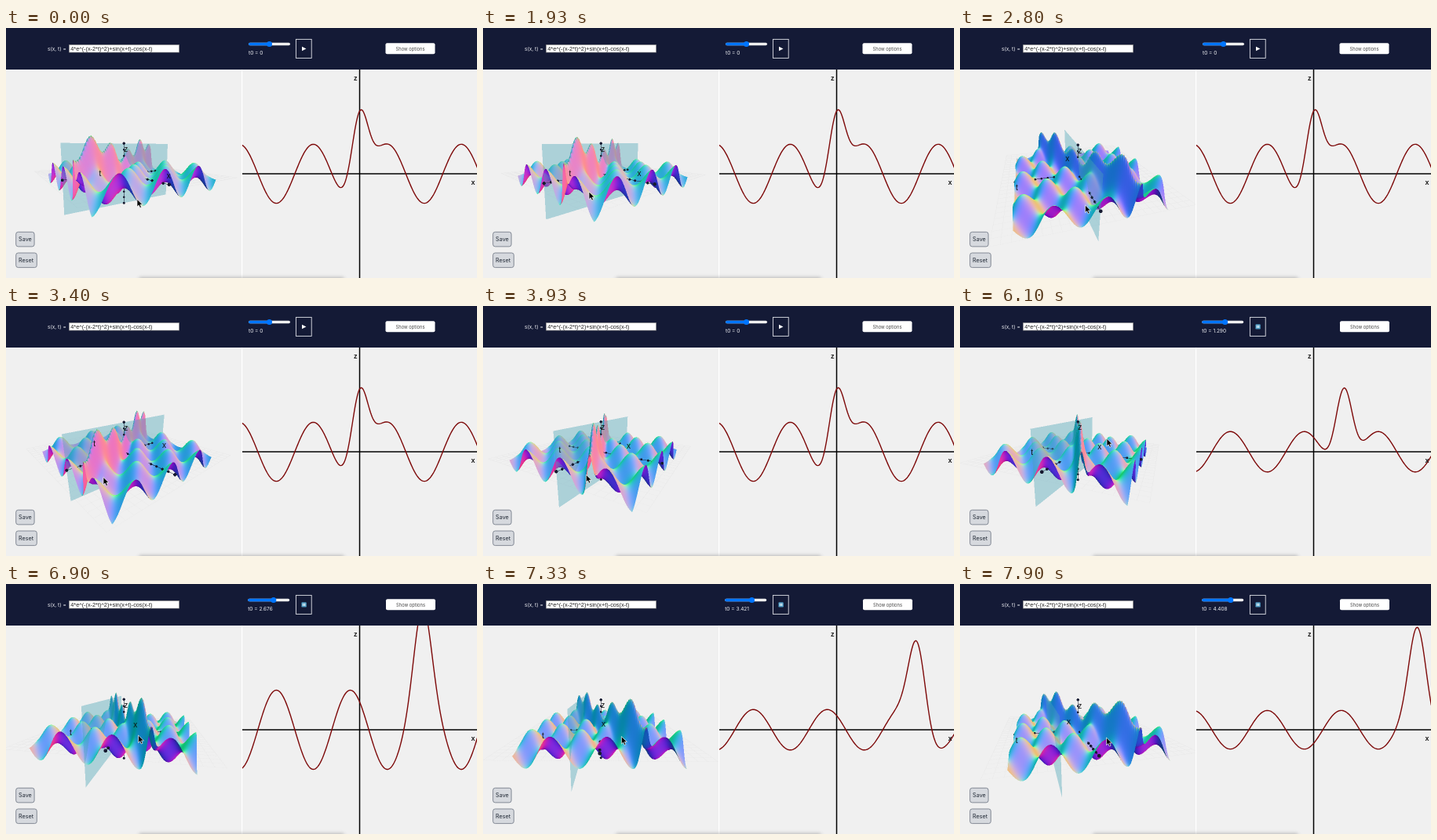
Recreate the animation shown at these times as an HTML page with a canvas. Size 600 px wide and 319 px high, loop 8 s.

```html
<!DOCTYPE html>
<html lang="en">
<head>
<meta charset="utf-8">
<style>
  html, body { margin: 0; width: 600px; height: 319px; overflow: hidden; background: #f0f0f0; }
  canvas { position: absolute; left: 0; top: 53px; width: 300px; height: 266px; }
  svg { position: absolute; left: 0; top: 0; }
  text { font-family: Inter, "Open Sans", sans-serif; }
  .light { fill: #f0f1f5; font-size: 6.5px; }
  .field { font: 7.3px "Liberation Sans", Arial, sans-serif; fill: #222; }
  .button rect { fill: #d6d9de; stroke: #6b7380; stroke-width: .8; }
  .button text { font-size: 7.2px; fill: #1f2733; }
  .axis { stroke: #000; stroke-width: 1.5; }
  .name { font: bold 9px "Liberation Sans", Arial, sans-serif; text-anchor: middle; fill: #222; }
  .tag { font: 10px "Liberation Sans", Arial, sans-serif; text-anchor: middle; fill: #111; }
</style>
</head>
<body>
<canvas id="scene" width="600" height="532"></canvas>
<svg width="600" height="319" viewBox="0 0 600 319">
  <defs>
    <clipPath id="plot"><rect x="301" y="53" width="299" height="266"/></clipPath>
    <filter id="soft" x="-10%" y="-200%" width="120%" height="500%"><feGaussianBlur stdDeviation="2"/></filter>
  </defs>
  <rect width="600" height="53" fill="#141a36"/>
  <text class="light" x="53" y="29">s(x, t) =</text>
  <rect x="80.3" y="21.3" width="140.4" height="9.8" fill="#fff" stroke="#777" stroke-width=".6"/>
  <text class="field" x="82.3" y="28.8">4*e^(-(x-2*t)^2)+sin(x+t)-cos(x-t)</text>

  <g id="slider">
    <rect x="309" y="18.7" width="53" height="3.6" rx="1.8" fill="#efefef"/>
    <rect id="fill" x="309" y="18.7" height="3.6" rx="1.8" fill="#0075ff"/>
    <circle id="thumb" cy="20.5" r="3.5" fill="#0075ff"/>
    <text id="value" class="light" x="309" y="34"></text>
  </g>
  <rect x="369.4" y="14.4" width="19.8" height="24" fill="none" stroke="#dfe1e8" stroke-width=".9"/>
  <path id="play" d="M377 23.7L382.4 26.5L377 29.3Z" fill="#fff"/>
  <g id="pause">
    <rect x="376.4" y="23.2" width="6.4" height="6.4" rx="1.2" fill="#4f9cc4"/>
    <path d="M378.6 24.8V28M380.6 24.8V28" stroke="#fff" stroke-width="1.1"/>
  </g>
  <g id="options">
    <rect x="483.5" y="19.3" width="63" height="14" rx="2" fill="#fff"/>
    <text x="515" y="28.6" text-anchor="middle" font-size="5.75" fill="#444">Show options</text>
  </g>

  <rect x="300" y="53" width="1.2" height="266" fill="#fff"/>
  <g clip-path="url(#plot)">
    <path class="axis" d="M301 186H600M450.5 53V319"/>
    <path id="curve" fill="none" stroke="#7d0909" stroke-width="1.4"/>
  </g>
  <text class="name" x="445.3" y="66.5">z</text>
  <text class="name" x="595" y="199.5">x</text>

  <text class="tag" id="tagX">x</text>
  <text class="tag" id="tagT">t</text>
  <text class="tag" id="tagZ">z</text>

  <g class="button">
    <rect x="12.7" y="260.3" width="23.4" height="18.6" rx="2.8"/><text x="16.1" y="272.2">Save</text>
    <rect x="12.7" y="287" width="26.6" height="18.6" rx="2.8"/><text x="16.1" y="298.9">Reset</text>
  </g>
  <rect x="169" y="318" width="262" height="6" rx="3" fill="#666" opacity=".4" filter="url(#soft)"/>
  <path id="cursor" d="M0 0V9.6L2.2 7.6L3.7 11L5.5 10.2L4 6.9H7Z" fill="#000" stroke="#fff" stroke-width=".7"/>
</svg>
<script>
const LOOP = 8000, SS = 2, W = 300 * SS, H = 266 * SS;
const DIST = 30, FOCAL = 230, HALF = 10, SEG = 128;
const $ = id => document.getElementById(id);
const wave = (x, t) => 4 * Math.exp(-((x - 2 * t) ** 2)) + Math.sin(x + t) - Math.cos(x - t);

// time, yaw, pitch, pointer x, pointer y
const keys = [
  [0, 33, 8.8, 167, 218.5],
  [330, 33, 8.8, 150, 216],
  [1030, 33, 8.8, 150, 216],
  [1430, 34.5, 9, 130, 210],
  [1630, 34.5, 9, 130, 210],
  [1930, 42.5, 10.2, 135, 209],
  [2800, 105.6, 27.5, 159.5, 226],
  [3400, 40.3, 22.2, 124, 218.5],
  [4250, 65, 15, 142, 212],
  [4950, 65, 15, 376, 24],
  [5430, 65, 15, 376, 24],
  [6300, 65, 15, 158, 192],
  [6900, 78, 14, 168.5, 193],
  [7900, 104, 18, 186.5, 196],
  [8000, 106, 18.2, 188, 196]
];

function secant(i, c) {
  const a = keys[i], b = keys[i + 1];
  return a && b ? (b[c] - a[c]) / (b[0] - a[0]) : 0;
}
function slope(i, c) {
  const a = secant(i - 1, c), b = secant(i, c);
  return a * b > 0 ? 2 * a * b / (a + b) : 0;
}
// monotone cubic through the keys
function track(time, c) {
  let i = 0;
  while (i < keys.length - 2 && time >= keys[i + 1][0]) i++;
  const a = keys[i], b = keys[i + 1], h = b[0] - a[0], u = (time - a[0]) / h, v = 1 - u;
  return a[c] * (1 + 2 * u) * v * v + b[c] * (3 - 2 * u) * u * u
    + h * u * v * (slope(i, c) * v - slope(i + 1, c) * u);
}
function clock(time) {
  if (time < 5230) return 0;
  return time < 5430 ? 0.03 : 0.13 + 1.732 * (time - 5431) / 1000;
}

// surface points with unit normals
const mesh = [];
for (let j = 0; j <= SEG; j++) {
  for (let i = 0; i <= SEG; i++) {
    const X = -HALF + 2 * HALF * i / SEG, T = -HALF + 2 * HALF * j / SEG, e = 1e-3;
    const dx = (wave(X + e, T) - wave(X - e, T)) / (2 * e);
    const dt = (wave(X, T + e) - wave(X, T - e)) / (2 * e);
    const n = 1 / Math.hypot(dx, dt, 1);
    mesh.push({ X, T, Z: wave(X, T), nx: -dx * n, nt: -dt * n, nz: n, x: 0, y: 0, w: 0, r: 0, g: 0, b: 0 });
  }
}

const ctx = $("scene").getContext("2d");
const image = ctx.createImageData(W, H);
const pixels = new Uint32Array(image.data.buffer);
const near = new Float32Array(W * H);
const rgb = (r, g, b) => (255 << 24 | b << 16 | g << 8 | r) >>> 0;
const BACK = rgb(240, 240, 240), INK = rgb(22, 26, 48), GRID = rgb(232, 232, 233);
let ca, sa, cp, sp;

function aim(yaw, pitch) {
  const r = Math.PI / 180;
  ca = Math.cos(yaw * r); sa = Math.sin(yaw * r);
  cp = Math.cos(pitch * r); sp = Math.sin(pitch * r);
}
function project(X, T, Z, out = {}) {
  const a = X * ca - T * sa, d = -X * sa - T * ca;
  const w = 1 / (DIST - d * cp - Z * sp);
  out.x = (150 + a * FOCAL * w) * SS;
  out.y = (133 - (Z * cp - d * sp) * FOCAL * w) * SS;
  out.w = w;
  return out;
}
// view-space normal as colour
function shade(p) {
  const a = p.nx * ca - p.nt * sa, d = -p.nx * sa - p.nt * ca;
  p.r = 127.5 + 127.5 * a;
  p.g = 127.5 + 127.5 * (p.nz * cp - d * sp);
  p.b = 127.5 + 127.5 * (d * cp + p.nz * sp);
}
function tint(i) {
  const c = pixels[i], mix = (v, to) => v * 0.6 + to * 0.4;
  pixels[i] = rgb(mix(c & 255, 72), mix(c >> 8 & 255, 163), mix(c >> 16 & 255, 182));
}
function triangle(p, q, r, glass) {
  const area = (q.x - p.x) * (r.y - p.y) - (q.y - p.y) * (r.x - p.x);
  if (!area) return;
  const k = 1 / area, under = area > 0;
  const x0 = Math.max(0, Math.ceil(Math.min(p.x, q.x, r.x)));
  const x1 = Math.min(W - 1, Math.floor(Math.max(p.x, q.x, r.x)));
  const y0 = Math.max(0, Math.ceil(Math.min(p.y, q.y, r.y)));
  const y1 = Math.min(H - 1, Math.floor(Math.max(p.y, q.y, r.y)));
  for (let y = y0; y <= y1; y++) {
    for (let x = x0; x <= x1; x++) {
      const u = ((q.x - x) * (r.y - y) - (q.y - y) * (r.x - x)) * k;
      const v = ((r.x - x) * (p.y - y) - (r.y - y) * (p.x - x)) * k;
      const s = 1 - u - v;
      if (u < 0 || v < 0 || s < 0) continue;
      const w = u * p.w + v * q.w + s * r.w, i = y * W + x;
      if (w <= near[i]) continue;
      if (glass) { tint(i); continue; }
      near[i] = w;
      const R = u * p.r + v * q.r + s * r.r;
      const G = u * p.g + v * q.g + s * r.g;
      const B = u * p.b + v * q.b + s * r.b;
      pixels[i] = under ? rgb(255 - R, 255 - G, 255 - B) : rgb(R, G, B);
    }
  }
}
function plot(x, y, w, color, keep) {
  x = Math.round(x); y = Math.round(y);
  if (x < 0 || y < 0 || x >= W || y >= H) return;
  const i = y * W + x;
  if (w <= near[i]) return;
  pixels[i] = color;
  if (keep) near[i] = w;
}
const spot = {};
function line(from, to, color, steps, keep) {
  for (let n = 0; n <= steps; n++) {
    const at = k => from[k] + (to[k] - from[k]) * n / steps;
    project(at(0), at(1), at(2), spot);
    plot(spot.x, spot.y, spot.w, color, keep);
  }
}
function ball(X, T, Z, size) {
  const c = project(X, T, Z), r = size * FOCAL * c.w * SS, w = 1 / (1 / c.w - size);
  for (let y = -Math.ceil(r); y <= r; y++)
    for (let x = -Math.ceil(r); x <= r; x++)
      if (x * x + y * y <= r * r) plot(c.x + x, c.y + y, w, INK, true);
}
function axis(dir, reach) {
  line(dir.map(v => -v * reach), dir.map(v => v * reach), INK, 400, true);
  for (let n = -reach; n <= reach; n++)
    if (n) ball(...dir.map(v => v * n), Math.abs(n) === reach ? 0.21 : 0.17);
}

function drawScene(t0) {
  pixels.fill(BACK);
  near.fill(0);
  // the floor grid never covers anything else
  const edge = 12;
  for (let g = -edge; g <= edge; g++) {
    line([g, -edge, 0], [g, edge, 0], GRID, 400);
    line([-edge, g, 0], [edge, g, 0], GRID, 400);
  }
  for (const p of mesh) { project(p.X, p.T, p.Z, p); shade(p); }
  for (let j = 0; j < SEG; j++) {
    for (let i = 0; i < SEG; i++) {
      const n = j * (SEG + 1) + i, m = n + SEG + 1;
      triangle(mesh[n], mesh[n + 1], mesh[m]);
      triangle(mesh[n + 1], mesh[m + 1], mesh[m]);
    }
  }
  axis([1, 0, 0], HALF);
  axis([0, 1, 0], HALF);
  axis([0, 0, 1], 5);
  const [a, b, c, d] = [[-1, -5], [1, -5], [1, 5], [-1, 5]].map(([s, z]) => project(s * HALF, t0, z));
  triangle(a, b, c, true);
  triangle(a, c, d, true);
  ctx.putImageData(image, 0, 0);
}

function setAll(el, attrs) {
  for (const k in attrs) el.setAttribute(k, attrs[k]);
}
function tag(id, X, T, Z) {
  const p = project(X, T, Z);
  setAll($(id), { x: p.x / SS + 2.7, y: 53 + p.y / SS + 11 });
}
function drawPanel(time, t0) {
  const playing = time >= 5000;
  const thumb = 312.7 + 45.6 * (t0 + 10) / 20;
  setAll($("fill"), { width: thumb - 309 });
  setAll($("thumb"), { cx: thumb });
  $("value").textContent = "t0 = " + (t0 ? t0.toFixed(3) : "0");
  setAll($("slider"), { transform: `translate(${playing ? -0.8 : 0})` });
  setAll($("options"), { transform: `translate(${playing ? 0.5 : 0})` });
  setAll($("play"), { visibility: playing ? "hidden" : "visible" });
  setAll($("pause"), { visibility: playing ? "visible" : "hidden" });

  let path = "";
  for (let px = 0; px <= 300; px++) {
    const y = 186 - 26.6 * wave((px - 150) / 15, t0);
    path += `${px ? "L" : "M"}${300.4 + px} ${y.toFixed(2)}`;
  }
  setAll($("curve"), { d: path });
  setAll($("cursor"), { transform: `translate(${track(time, 3)} ${track(time, 4)})` });
}

function render(time) {
  const t0 = clock(time);
  aim(track(time, 1), track(time, 2));
  drawScene(t0);
  tag("tagX", HALF, 0, 0);
  tag("tagT", 0, HALF, 0);
  tag("tagZ", 0, 0, 5);
  drawPanel(time, t0);
}

const start = performance.now();
function tick() {
  render((performance.now() - start) % LOOP);
  requestAnimationFrame(tick);
}
tick();
</script>
</body>
</html>
```
